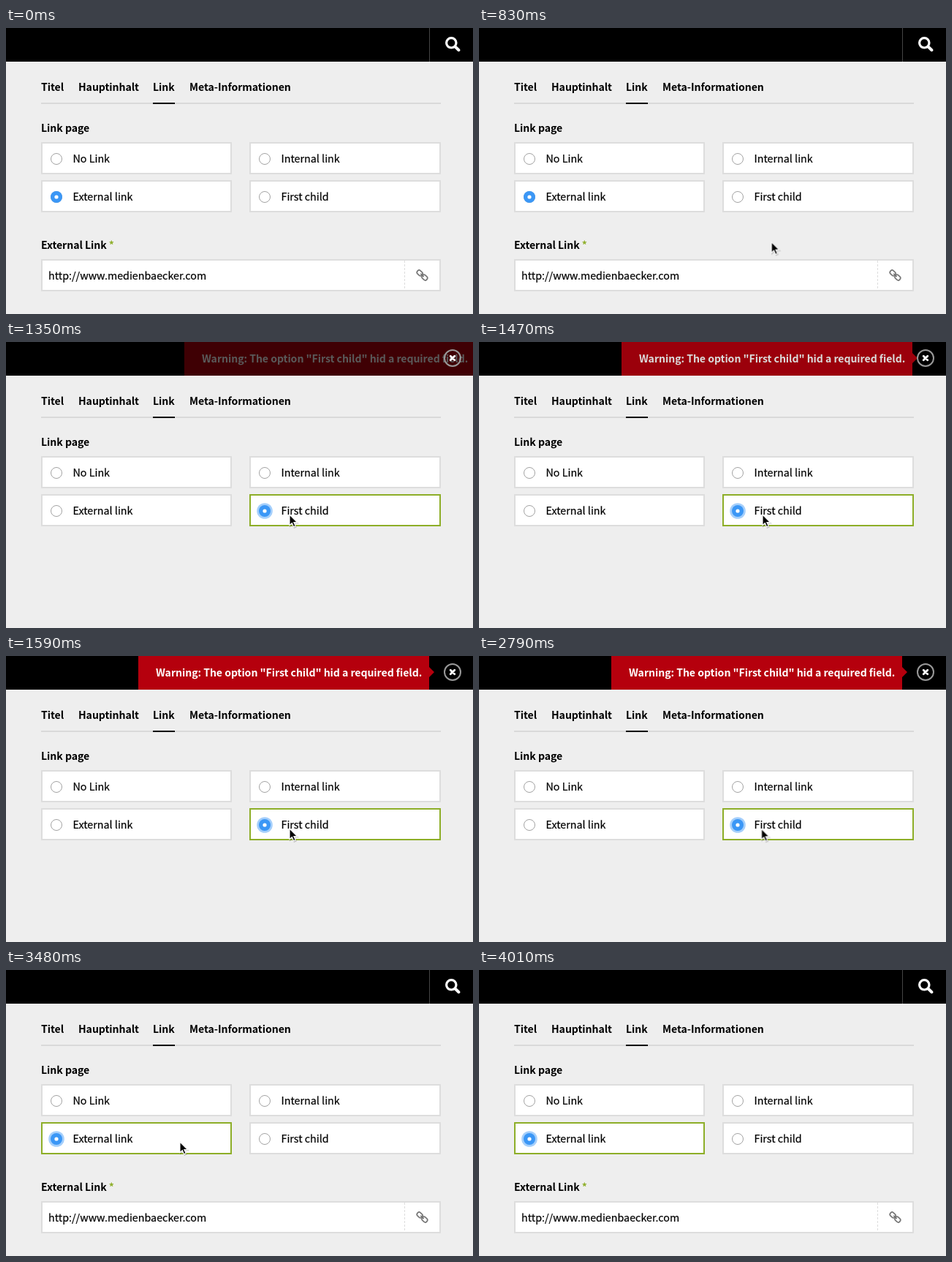
These frames come from a looping animation (639 by 391 pixels, 4.6 s). An HTML page:

```html
<!DOCTYPE html>
<html lang="de">
<head>
<meta charset="utf-8">
<title>Link page</title>
<style>
  html, body { margin: 0; width: 100%; height: 100%; overflow: hidden; background: #eee; }
  svg { display: block; width: 639px; height: 391px; }
  text {
    font: 400 14.3px "Noto Sans CJK JP", "Noto Sans CJK SC", "Noto Sans CJK", "Noto Sans", sans-serif;
    fill: #000; stroke: #000; stroke-width: .2px; white-space: pre;
  }
  .bold { font-weight: 600; font-size: 14.1px; letter-spacing: -.06px; stroke: none; }
  .box { fill: #fff; stroke: #ddd; stroke-width: 2; }
  .focus { fill: none; stroke: #8dae28; stroke-width: 2; }
  .radio { fill: #fff; stroke: #a3a3a3; }
  .pressed { fill: #d8d8d8; stroke: #888; }
  .halo { fill: #a5cffb; }
  .on { fill: #3b97f6; }
  .dot { fill: #fff; }
  .icon { fill: none; stroke: #fff; stroke-linecap: round; }
  .away, .refocus, .press, #banner, #cursor { opacity: 0; }
</style>
</head>
<body>
<svg viewBox="0 0 639 391">
  <rect width="639" height="391" fill="#eee"/>
  <rect width="639" height="46"/>

  <g class="home">
    <rect x="579" width="1" height="46" fill="#444"/>
    <g class="icon">
      <circle cx="609.3" cy="20.3" r="6.7" stroke-width="3.2"/>
      <path d="M614.8 25.8L619.5 30.2" stroke-width="4"/>
    </g>
  </g>

  <g id="banner">
    <path d="M181 0H579V15L586 22L579 29V46H181Z" fill="#b5000d"/>
    <text class="bold" x="205" y="28" style="fill:#fff">Warning: The option "First child" hid a required field.</text>
  </g>
  <g class="icon away">
    <circle cx="611" cy="22" r="11" stroke="#999" stroke-width="2"/>
    <path d="M608.2 19.2l5.6 5.6m0-5.6l-5.6 5.6" stroke-width="2.8"/>
  </g>

  <g class="bold">
    <text class="bold" x="48" y="86">Titel</text>
    <text class="bold" x="99" y="86">Hauptinhalt</text>
    <text class="bold" x="201" y="86">Link</text>
    <text class="bold" x="251" y="86">Meta-Informationen</text>
  </g>
  <rect x="48" y="102" width="547" height="2" fill="#d9d9d9"/>
  <rect x="201" y="102" width="30" height="2"/>
  <text class="bold" x="48" y="142">Link page</text>

  <g id="options"></g>

  <g class="home">
    <text class="bold" x="48" y="302">External Link <tspan style="fill:#8dae28">*</tspan></text>
    <rect class="box" x="49" y="317" width="545" height="42"/>
    <text x="58" y="344">http://www.medienbaecker.com</text>
    <path d="M545.5 318V358" stroke="#ddd" stroke-dasharray="3 2"/>
    <g transform="translate(569.5 338) rotate(43)" fill="none" stroke="#777" stroke-width="1.7">
      <rect x="-8.6" y="-2.9" width="8.2" height="5.8" rx="2.6"/>
      <rect x=".4" y="-2.9" width="8.2" height="5.8" rx="2.6"/>
      <path d="M-3 0H3"/>
    </g>
  </g>

  <g id="cursor">
    <path d="M0 0V14.6L3.3 11.5L5.6 16.7L8.1 15.6L5.8 10.6H10.4Z" transform="translate(.8 1.2)" fill="#000" stroke="#000" stroke-width="1.6" opacity=".18"/>
    <path d="M0 0V14.6L3.3 11.5L5.6 16.7L8.1 15.6L5.8 10.6H10.4Z" stroke="#fff" stroke-width="1.1"/>
  </g>
</svg>
<script>
  const LOOP = 4600, CHECK_FIRST = 1290, CHECK_EXTERNAL = 3480;

  const options = [
    { label: 'No Link', x: 48, y: 156, width: 261 },
    { label: 'Internal link', x: 333, y: 156, width: 262 },
    { label: 'External link', x: 48, y: 208, width: 261, checked: 'home', focus: 'refocus', press: 'external' },
    { label: 'First child', x: 333, y: 208, width: 262, checked: 'away', focus: 'away', press: 'first' }
  ];

  const drawOption = ({ label, x, y, width, checked, focus, press }) => {
    const frame = `x="1" y="1" width="${width - 2}" height="42"`;
    const circle = (name, r) => `<circle class="${name}" cx="21" cy="23" r="${r}"/>`;
    const states = checked ? `
      <g class="press ${press}">${circle('radio pressed', 7.5)}</g>
      <g class="${focus}"><rect class="focus" ${frame}/>${circle('halo', 10.8)}</g>
      <g class="${checked}">${circle('on', 8)}${circle('dot', 2.6)}</g>` : '';
    return `<g transform="translate(${x} ${y})">
      <rect class="box" ${frame}/>${circle('radio', 7.5)}${states}
      <text x="43.5" y="28">${label}</text></g>`;
  };
  document.querySelector('#options').innerHTML = options.map(drawOption).join('');

  // Each entry is [time in ms, styles]; styles hold until the next entry.
  const play = (selector, steps) => {
    const keyframes = steps.map(([ms, styles]) => ({ offset: ms / LOOP, easing: 'step-end', ...styles }));
    keyframes.push({ ...keyframes.at(-1), offset: 1 });
    document.querySelectorAll(selector).forEach(el =>
      el.animate(keyframes, { duration: LOOP, iterations: Infinity }));
  };

  const showBetween = (selector, from, to) => play(selector, [
    [0, { opacity: 0 }], [from, { opacity: 1 }], [to, { opacity: 0 }]
  ]);

  // Evenly spaced poses from start to end, both included.
  const series = (start, end, count, pose) => Array.from({ length: count }, (_, i) =>
    [start + (end - start) * i / (count - 1), pose(i)]);

  const at = (x, y) => ({ opacity: 1, transform: `translate(${x.toFixed(1)}px, ${y.toFixed(1)}px)` });
  const hidden = { opacity: 0, transform: 'none' };

  play('.home', [[0, { opacity: 1 }], [CHECK_FIRST, { opacity: 0 }], [CHECK_EXTERNAL, { opacity: 1 }]]);
  showBetween('.away', CHECK_FIRST, CHECK_EXTERNAL);
  showBetween('.first', 1230, CHECK_FIRST);
  showBetween('.external', 3360, CHECK_EXTERNAL);
  play('.refocus', [[0, { opacity: 0 }], [CHECK_EXTERNAL, { opacity: 1 }]]);

  const slideIn = series(CHECK_FIRST, 1590, 6, i => {
    const p = [.1, .35, .65, .86, .97, 1][i];
    return { opacity: p, transform: `translateX(${Math.round(97 * (1 - p))}px)` };
  });
  play('#banner', [[0, hidden], ...slideIn, [CHECK_EXTERNAL, hidden]]);

  const enter = series(600, 1120, 10, i => {
    const left = 1 - i / 9;
    return at(388 + 19 * left ** 1.1, 236 + 138 * left ** 2.2);
  });
  const cross = series(2790, 3240, 9, i => {
    const u = (i + .5) / 8.5, p = u * u * (3 - 2 * u);
    return at(388 - 150 * p, 236 - p + 9 * Math.sin(Math.PI * p));
  });
  const leave = series(3780, 3953, 4, i => {
    const p = ((i + 1) / 4) ** 1.6;
    return at(238 + 73 * p, 235 + 126 * p);
  });
  play('#cursor', [[0, hidden], ...enter, ...cross, ...leave, [4010, hidden]]);
</script>
</body>
</html>
```
